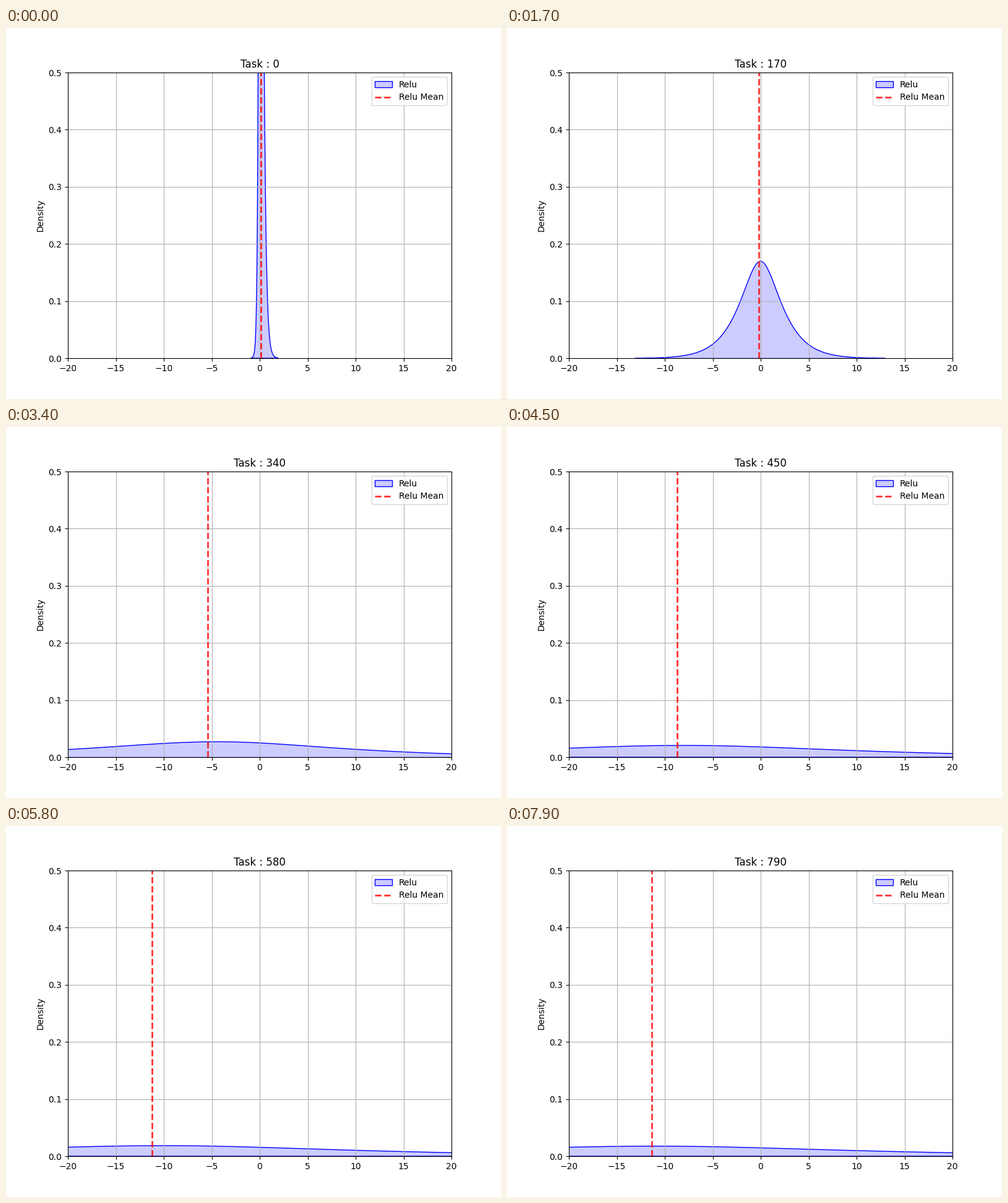
Recreate the animation shown at these times as a matplotlib script. Size 800 by 600 pixels, loop 8 s.

```python
import numpy as np
import matplotlib.pyplot as plt
from matplotlib.animation import FuncAnimation

FRAMES = 80
STEP = 10  # tasks per frame

# Key points (frame, mean) of the wandering dashed line
MEAN_PATH = [(0, 0.15), (17, -0.2), (34, -5.45), (45, -8.68),
             (58, -11.25), (70, -15.07), (79, -11.38)]


def mean_at(i):
    return np.interp(i, *zip(*MEAN_PATH))


def density(i):
    """Peaked curve that widens along an S-curve and drifts to the left."""
    growth = i**4 / (i**4 + 30**4)
    mode = 0.05 - 11.5 * growth**2
    spread = 0.5 + 57.5 * growth  # 1 / peak height
    x = np.linspace(-0.9 - 0.72 * i, 1.9 + 0.65 * i, 400)
    z = x - mode
    # Round top with exponential tails, slightly skewed to the right
    tail = np.where(z < 0, 0.32 * spread - 0.06, 0.3 * spread + 0.05)
    return x, np.exp(1 - np.hypot(1, z / tail)) / spread


fig, ax = plt.subplots(figsize=(8, 6), dpi=100)
area = ax.fill_between(*density(0), facecolor=(0, 0, 1, 0.2), edgecolor="blue",
                       linewidth=1, label="Relu")
mean_line = ax.axvline(mean_at(0), color="red", linestyle="--", linewidth=2,
                       alpha=0.8, label="Relu Mean")
ax.set(xlim=(-20, 20), ylim=(0, 0.5), ylabel="Density")
ax.grid(True)
ax.legend(loc="upper right")
title = ax.set_title("Task : 0")


def update(i):
    x, y = density(i)
    outline = np.column_stack([np.r_[x[0], x, x[-1]], np.r_[0, y, 0]])
    area.set_verts([outline])
    mean_line.set_xdata([mean_at(i)] * 2)
    title.set_text(f"Task : {i * STEP}")
    return area, mean_line, title


anim = FuncAnimation(fig, update, frames=FRAMES, interval=100, repeat=True,
                     repeat_delay=0, blit=False)
plt.show()
```
